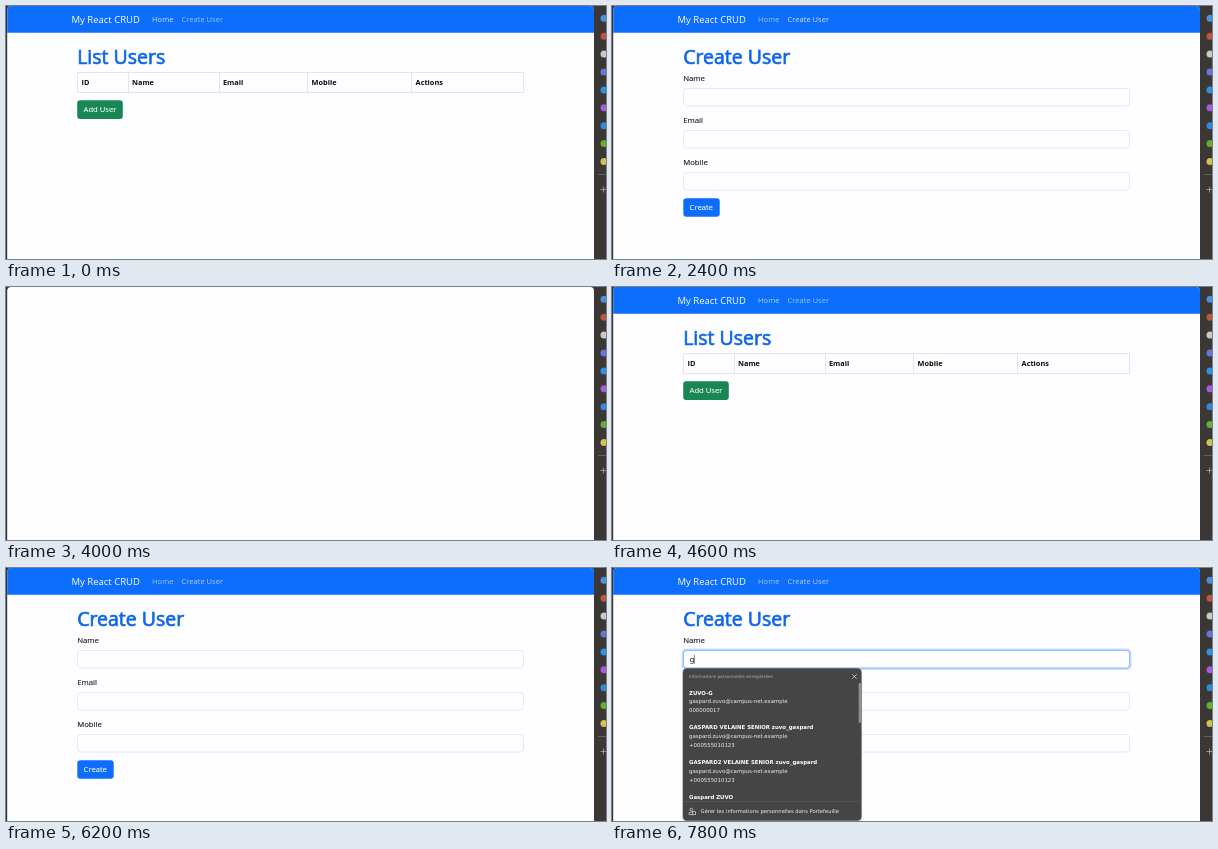
These frames come from a looping animation (600 by 253 pixels, 8000 ms). An HTML page:

```html
<!DOCTYPE html>
<html lang="en">
<head>
<meta charset="utf-8">
<title>User form</title>
<style>
  html, body { margin: 0; width: 100%; height: 100%; overflow: hidden; background: #3b3735; }
  svg { display: block; width: 600px; height: 253px; }
  text { font: 7.75px "Open Sans", "Noto Sans", sans-serif; fill: #16181b; white-space: pre; }
  .label { stroke: #16181b; stroke-width: .12; }
  .brand { font-size: 9.5px; fill: #fff; }
  .nav { font-size: 7.55px; fill: #fff; }
  .btn { font-size: 7.65px; fill: #fff; stroke: #fff; stroke-width: .1; }
  .title { font-size: 19.5px; fill: #0c66ea; stroke: #0c66ea; stroke-width: .7; }
  .th { font-size: 7.35px; font-weight: 700; fill: #0c0c0e; }
  .line { fill: none; stroke: #e4e4e9; }
  .field { fill: #fefdff; stroke: #e8e7ec; }
  #typed { font-family: "Noto Sans", sans-serif; }
  #menu text { font: 5.4px "DejaVu Sans", sans-serif; fill: #eee; }
  #menu .bold { font-weight: 700; fill: #fff; }
  #menu .head { font-size: 4.3px; fill: #b0b0b0; }
  #menu .foot { font-size: 5.23px; }
</style>
</head>
<body>
<svg viewBox="0 0 600 253">
  <rect width="600" height="253" fill="#3b3735"/>
  <path d="M1.2 253V4q0-4 4-4H584q4 0 4 4V253z" fill="#fefdff"/>
  <g id="side"></g>

  <g id="bar">
    <path d="M1.2 26.8V4q0-4 4-4H584q4 0 4 4V26.8z" fill="#0d6efd"/>
    <text class="brand" x="65.5" y="16.6">My React CRUD</text>
    <text class="nav" id="home" x="146" y="16.2">Home</text>
    <text class="nav" id="create" x="175.6" y="16.2">Create User</text>
  </g>

  <g id="list">
    <text class="title" x="71.2" y="57.6">List Users</text>
    <path class="line" d="M71.5 66.5H517.5V86.5H71.5zM122.5 66.5v20M213.5 66.5v20M301.5 66.5v20M405.5 66.5v20"/>
    <g id="heads"></g>
    <rect id="add" x="71.2" y="94.3" width="45.6" height="18.8" rx="3"/>
    <text class="btn" x="77.6" y="106.4">Add User</text>
  </g>

  <g id="form">
    <text class="title" x="71.2" y="57.6">Create User</text>
    <g id="fields"></g>
    <rect x="71.3" y="192.3" width="36.4" height="18.4" rx="3" fill="#0d6efd"/>
    <text class="btn" x="77.6" y="204.3">Create</text>
    <g id="ring" fill="none">
      <rect x="70.5" y="81.5" width="448" height="19.5" rx="4" stroke="#c3dbfe" stroke-width="2"/>
      <rect x="71.5" y="82.5" width="446" height="17.5" rx="3" stroke="#8fbcfd"/>
    </g>
    <text id="typed" x="77.6" y="94.2">g</text>
    <path id="caret" stroke="#444" stroke-width=".7"/>
  </g>

  <g id="menu">
    <rect x="70.3" y="100.3" width="179.9" height="154" rx="4" fill="#000" opacity=".12"/>
    <rect x="71" y="100.5" width="178.3" height="152" rx="4" fill="#454545" stroke="#505050" stroke-width=".5"/>
    <text class="head" x="77" y="110">Informations personnelles enregistrées</text>
    <path d="M240.3 106.3l4.4 4.4m0-4.4l-4.4 4.4" stroke="#ddd" stroke-width=".8"/>
    <rect id="thumb" x="246.7" y="115" width="2.3" height="40" rx="1" fill="#919191"/>
    <g id="people"></g>
    <path d="M71 233.5H249.3" stroke="#5a5a5a" stroke-width=".7"/>
    <g fill="none" stroke="#ddd" stroke-width=".7">
      <circle cx="79.3" cy="241.6" r="1.4"/>
      <path d="M80 246.6h-3v-1.3q0-1.1 1.2-1.1h2"/>
      <rect x="80.6" y="243.7" width="3" height="3"/>
    </g>
    <text class="foot" x="88.6" y="245">Gérer les informations personnelles dans Portefeuille</text>
  </g>
</svg>
<script>
const $ = id => document.getElementById(id);
const label = (x, y, s, cls = "") => `<text x="${x}" y="${y}" class="${cls}">${s}</text>`;

$("side").innerHTML =
  ["#4a90dc", "#b9573f", "#c9c9c9", "#6676d8", "#2e92e2", "#a65cdb", "#3189da", "#63b02f", "#d3c250"]
    .map((c, i) => `<circle cx="598" cy="${12.3 + i * 17.9}" r="3.5" fill="${c}"/>`).join("") +
  `<path d="M592 168.5h8" stroke="#66605d"/>
   <path d="M594.5 183.5h5.5M597.5 180.5v6" stroke="#aaa" stroke-width=".8"/>`;

$("heads").innerHTML =
  [["ID", 75.6], ["Name", 126], ["Email", 217], ["Mobile", 305.6], ["Actions", 409.6]]
    .map(([s, x]) => label(x, 79, s, "th")).join("");

$("fields").innerHTML = ["Name", "Email", "Mobile"].map((s, i) => {
  const y = i * 41.9;
  return label(71.2, 74.8 + y, s, "label") +
    `<rect class="field" x="71.5" y="${82.5 + Math.round(y)}" width="446" height="17.5" rx="3"/>`;
}).join("");

const mail = "gaspard.zuvo@campus-net.example";
const phone = "+000555010123";
$("people").innerHTML = [
  ["ZUVO-G", mail, "000000017"],
  ["GASPARD VELAINE SENIOR zuvo_gaspard", mail, phone],
  ["GASPARD2 VELAINE SENIOR zuvo_gaspard", mail, phone],
  ["Gaspard ZUVO"]
].map((rows, i) => rows.map((s, j) =>
  label(77, 126.6 + i * 34.8 + j * 8.8, s, j ? "" : "bold")).join("")).join("");

// Value of the last [start, value] step reached at time t
const at = (t, steps) => steps.filter(s => s[0] <= t).pop()[1];
const show = (id, on) => $(id).setAttribute("display", on ? "inline" : "none");

function draw(now) {
  const t = Math.floor(now % 8000 / 200) * 200;
  const page = at(t, [[0, "list"], [2000, "form"], [4000, ""], [4200, "list"], [6000, "form"]]);
  show("bar", page);
  show("list", page === "list");
  show("form", page === "form");
  $("home").setAttribute("fill-opacity",
    at(t, [[0, .8], [1800, .6], [4600, .7], [4800, .8], [5800, .75], [6000, .6]]));
  $("create").setAttribute("fill-opacity",
    at(t, [[0, .58], [1200, .8], [3000, .7], [3200, .58], [6000, .65]]));
  $("add").setAttribute("fill", at(t, [[0, "#198754"], [5400, "#157347"], [5800, "#146c43"]]));

  const typed = t >= 7800;
  show("ring", t >= 7200);
  show("menu", t >= 7400);
  show("thumb", typed);
  show("typed", typed);
  show("caret", t >= 7000 && t !== 7600);
  $("caret").setAttribute("d", `M${typed ? 82.4 : 78.2} 87v8.6`);
  requestAnimationFrame(draw);
}
requestAnimationFrame(draw);
</script>
</body>
</html>
```
